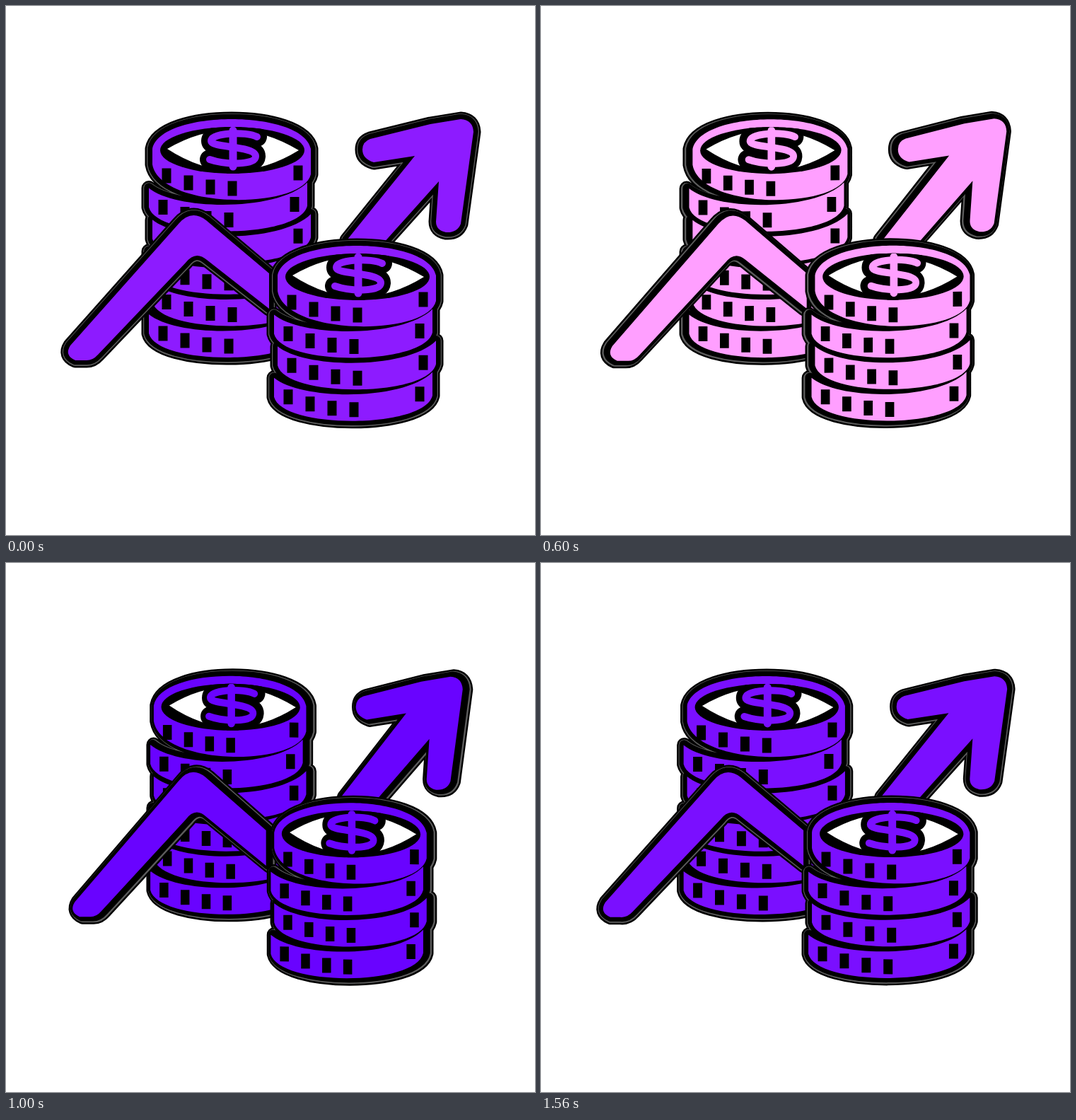
Recreate the animation shown at these times as an HTML page with a canvas. Size 748x748 px, loop 1600 ms.

```html
<!DOCTYPE html>
<html>
<head>
<meta charset="utf-8">
<title>Growing coins</title>
<style>
  html, body { margin: 0; width: 100%; height: 100%; overflow: hidden; background: #fff; }
  canvas { display: block; }
</style>
</head>
<body>
<canvas width="748" height="748"></canvas>
<script>
const ctx = document.querySelector('canvas').getContext('2d');
const LOOP = 1600, STEP = 40, MID = 375;
const COIN = 229, PITCH = 44.6;

// Curve from the current point (x0, y0) to (x1, y1) passing mid halfway;
// a small inset gives a round edge, a large one a flat edge
function rim(x0, y0, mid, x1, y1, inset) {
  const c = (mid - (y0 + y1) / 8) * 4 / 3, dx = (x1 - x0) * inset;
  return `C${x0 + dx} ${c} ${x1 - dx} ${c} ${x1} ${y1}`;
}

// Side of coin i in a stack; y is the lowest point of its rim
function coin(x, y, i) {
  const l = x, r = x + COIN - 5;
  const top = i
    ? `M${l} ${y - 61}` + rim(l, y - 61, y - PITCH + 7, r, y - 69, 0.18)
    : `M${l} ${y - 72}` + rim(l, y - 72, y - 114, r, y - 72, 0.05);
  const left = y - (i ? 34 : 50), right = y - 36;
  return top + `L${r} ${right}` + rim(r, right, y, l, left, 0.05) + 'Z';
}

const slot = (x, y) => `M${x - 6.5} ${y - 10.5}h13v21h-13Z`;

function slots(x, y) {
  let d = slot(x + COIN - 23, y - 38);
  for (let i = 0; i < 4; i++) d += slot(x + 20 + 31 * i, y - 16 - 18 * (1 - i / 3) ** 2);
  return d;
}

// Coins lie alternately a little right and left
function stack(x, y, count, extra = '') {
  let shape = extra, marks = '';
  for (let i = count - 1; i >= 0; i--) {
    const cx = x + (i % 2 ? -3 : 2), cy = y + PITCH * i;
    shape += coin(cx, cy, i);
    marks += slots(cx, cy);
  }
  return { shape: new Path2D(shape), marks: new Path2D(marks), face: [x + 115, y - 70] };
}

const arrow = 'M504 203Q504 192 515 188L600 167L643 160Q660 161 661 178L643 308' +
  'Q638 321 622 320Q608 317 608 305L612 248L533 336L482 331L578 212L520 221Q504 216 504 203Z';
const chevron = 'M91 480L244 308Q262 287 283 303L372 378V428L284 359Q268 345 254 363' +
  'L130 493Q122 502 112 501H98Q82 494 91 480Z';

const groups = [
  stack(205, 274, 6, arrow),
  { shape: new Path2D(chevron) },
  stack(382, 453, 4)
];

const eye = new Path2D('M-92 -2Q0 -56 94 0Q0 58 -92 -2Z');
const lens = new Path2D();
lens.ellipse(0, 0, 102, 33, 0, 0, 7);
const curl = new Path2D('M35 -19C20 -27 -30 -25 -30 -13C-30 -3 34 -7 33 9C32 22 -12 20 -32 13');
const bar = new Path2D('M1 -28V23');

// Turn the flat artwork; dx slides nearer layers sideways
function place(s, dx, dy = 0) {
  const k = 1 - 0.06 * s * s + 0.011 * s, skew = -0.004 * s;
  ctx.setTransform(k, skew, 0, 1, MID * (1 - k) + dx, dy - skew * MID);
}

function line(path, width, color) {
  ctx.lineWidth = width;
  ctx.strokeStyle = color;
  ctx.stroke(path);
}

function fill(path, color) {
  ctx.fillStyle = color;
  ctx.fill(path);
}

function drawFace([x, y], s, slide, color) {
  ctx.save();
  place(s, slide);
  ctx.translate(x, y);
  fill(lens, '#000');
  ctx.clip(lens);
  ctx.translate(-0.4 * slide, 0);
  fill(eye, '#fff');
  line(curl, 28, '#000');
  line(bar, 26, '#000');
  ctx.translate(0.4 * slide, 0);
  line(curl, 10, color);
  line(bar, 11, color);
  ctx.restore();
}

function draw(t) {
  const s = Math.sin(2 * Math.PI * t / LOOP);
  const slide = 5.7 * s - 0.8 * s * s;
  // Purple base plus a glint that peaks part way through the turn
  const glint = 187 / (1 + 5.08 * (s - 0.575) ** 2) ** 2;
  const color = `rgb(${Math.min(255, 102 + 1.5 * glint)},${glint + 1},255)`;

  ctx.setTransform(1, 0, 0, 1, 0, 0);
  ctx.fillStyle = '#fff';
  ctx.fillRect(0, 0, 748, 748);
  ctx.lineJoin = ctx.lineCap = 'round';

  for (const { shape, marks, face } of groups) {
    place(s, 0);
    line(shape, 21, '#000');
    line(shape, 16, '#5c5c5c');
    place(s, 1.6 * s, -0.5);
    line(shape, 13.5, '#000');
    place(s, slide);
    fill(shape, color);
    if (marks) {
      fill(marks, '#000');
      drawFace(face, s, slide, color);
    }
  }
}

function tick() {
  const t = performance.now() % LOOP;
  draw(Math.floor(t / STEP) * STEP);
  requestAnimationFrame(tick);
}
tick();
</script>
</body>
</html>
```
